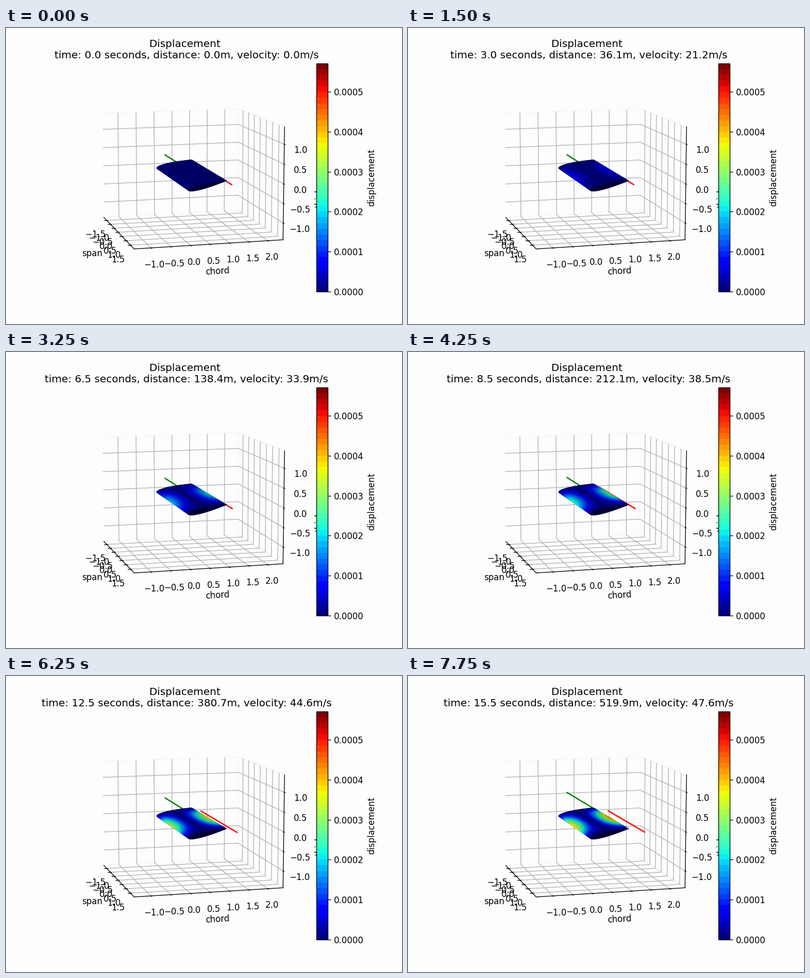
A matplotlib script for the animation above (8000 ms loop, 768x576 px).

```python
import numpy as np
import matplotlib.pyplot as plt
from matplotlib.animation import FuncAnimation
from matplotlib.cm import ScalarMappable
from matplotlib.colors import Normalize
from mpl_toolkits.mplot3d.art3d import Poly3DCollection

FRAMES, INTERVAL, DT = 32, 250, 0.5
HALF_SPAN, TILT, THICKNESS = 5 / 3, np.radians(11), 0.125
N_SPAN, N_LOOP = 30, 48
VMAX = 0.0005713
BG = "#fdfdfd"
LIGHT = np.array([-2, -2, 1]) / 3

# Speed curve: time, velocity and acceleration at a few knots
KNOTS = np.array([
    (0, 0, 3.4), (2, 14.4, 8.2), (4.5, 27.8, 3.8), (6.5, 33.9, 2.6),
    (10, 41.1, 1.55), (12.5, 44.6, 1.15), (15.5, 47.6, 0.9),
])


def velocity(t):
    """Cubic Hermite curve through the knots."""
    i = min(np.searchsorted(KNOTS[:, 0], t, side="right"), len(KNOTS) - 1)
    (t0, v0, a0), (t1, v1, a1) = KNOTS[i - 1], KNOTS[i]
    h = t1 - t0
    u = (t - t0) / h
    bend = (a0 * h - v1 + v0) * (1 - u) - (a1 * h - v1 + v0) * u
    return v0 + (v1 - v0) * u + u * (1 - u) * bend


times = np.arange(FRAMES) * DT
speeds = np.array([velocity(t) for t in times])
distances = np.cumsum(speeds) * DT


def airfoil():
    """Closed tilted section: chord fraction and (chord, height) points."""
    angle = np.linspace(0, 2 * np.pi, N_LOOP + 1)
    c = (1 + np.cos(angle)) / 2
    t = 5 * THICKNESS * (0.2969 * np.sqrt(c) - 0.126 * c - 0.3516 * c**2
                         + 0.2843 * c**3 - 0.1036 * c**4)
    t *= np.sign(np.sin(angle))
    cos, sin = np.cos(TILT), np.sin(TILT)
    y = 0.496 + (c - 0.5) * cos - t * sin
    z = 0.01 + (c - 0.5) * sin + t * cos
    return c, y, z


def wing():
    """Quads of skin and near tip, with displacement shape and shading."""
    c, y, z = airfoil()
    span = np.linspace(-HALF_SPAN, HALF_SPAN, N_SPAN + 1)
    quads, shape = [], []

    def add(corners):
        quads.append([(x, y[j], z[j]) for x, j in corners])
        x_mid = np.mean([x for x, _ in corners])
        c_mid = np.mean([c[j] for _, j in corners])
        along = np.cos(np.pi / 2 * x_mid / HALF_SPAN) ** 1.25
        shape.append(along * (abs(c_mid - 0.46) / 0.54) ** 1.2)

    for a, b in zip(span[:-1], span[1:]):
        for j in range(N_LOOP):
            add([(a, j), (b, j), (b, j + 1), (a, j + 1)])
    tip = span[-1]
    for j in range(N_LOOP // 2):
        add([(tip, k) for k in (j, j + 1, N_LOOP - j - 1, N_LOOP - j)])

    quads = np.array(quads)
    normal = np.cross(quads[:, 2] - quads[:, 0], quads[:, 3] - quads[:, 1])
    normal /= np.linalg.norm(normal, axis=1, keepdims=True) + 1e-12
    outward = quads.mean(axis=1) - (0, 0.496, 0.01)
    outward[:N_SPAN * N_LOOP, 0] = 0
    normal *= np.sign((normal * outward).sum(axis=1, keepdims=True))
    return quads, np.array(shape), 0.65 + 0.35 * normal @ LIGHT


fig = plt.figure(figsize=(6.4, 4.8), dpi=120, facecolor=BG)
ax = fig.add_subplot(projection="3d", computed_zorder=False, facecolor=BG)
for axis in (ax.xaxis, ax.yaxis, ax.zaxis):
    axis.pane.fill = False

norm = Normalize(0, VMAX)
smooth, stepped = plt.get_cmap("jet"), plt.get_cmap("jet", 40)
fig.colorbar(ScalarMappable(norm, stepped), ax=ax, label="displacement")

quads, shape, shade = wing()
skin = Poly3DCollection(quads, linewidths=0.4, zorder=5)
ax.add_collection3d(skin)
ends = np.array([-HALF_SPAN, HALF_SPAN])
flat = np.ones(2)
drag, = ax.plot(ends, 1.12 * flat, 0 * flat, color="r", zorder=2)
lift, = ax.plot(ends, 0.245 * flat, 0.27 * flat, color="g", zorder=2)

ax.set(xlabel="span", ylabel="chord", zlabel="thickness")
ax.set_xlim(-1.9097, 1.9097)
ax.set_ylim(0.491 - 1.9097, 0.491 + 1.9097)
ax.set_zlim(0.003 - 1.4323, 0.003 + 1.4323)
ax.view_init(elev=10, azim=-15)
title = ax.set_title("Displacement", y=1.0)
title.set_y(1.0)  # 3D axes lower their title, so lift it back to the top


def update(i):
    t, v = times[i], speeds[i]
    title.set_text(f"Displacement \ntime: {t:.1f} seconds, "
                   f"distance: {distances[i]:.1f}m, velocity: {v:.1f}m/s")
    colors = smooth(norm(0.00045 * (v / 47.6) ** 2.2 * shape))
    colors[:, :3] *= shade[:, None]
    skin.set_facecolor(colors)
    skin.set_edgecolor(colors)
    push = 0.285 * (t / 15.5) ** 3.4
    drag.set_data_3d(ends, (1.12 + push) * flat, 0 * flat)
    lift.set_data_3d(ends, 0.245 * flat, (0.27 + push) * flat)
    return skin, drag, lift, title


anim = FuncAnimation(fig, update, frames=FRAMES, interval=INTERVAL,
                     repeat=True, repeat_delay=0)
plt.show()
```
